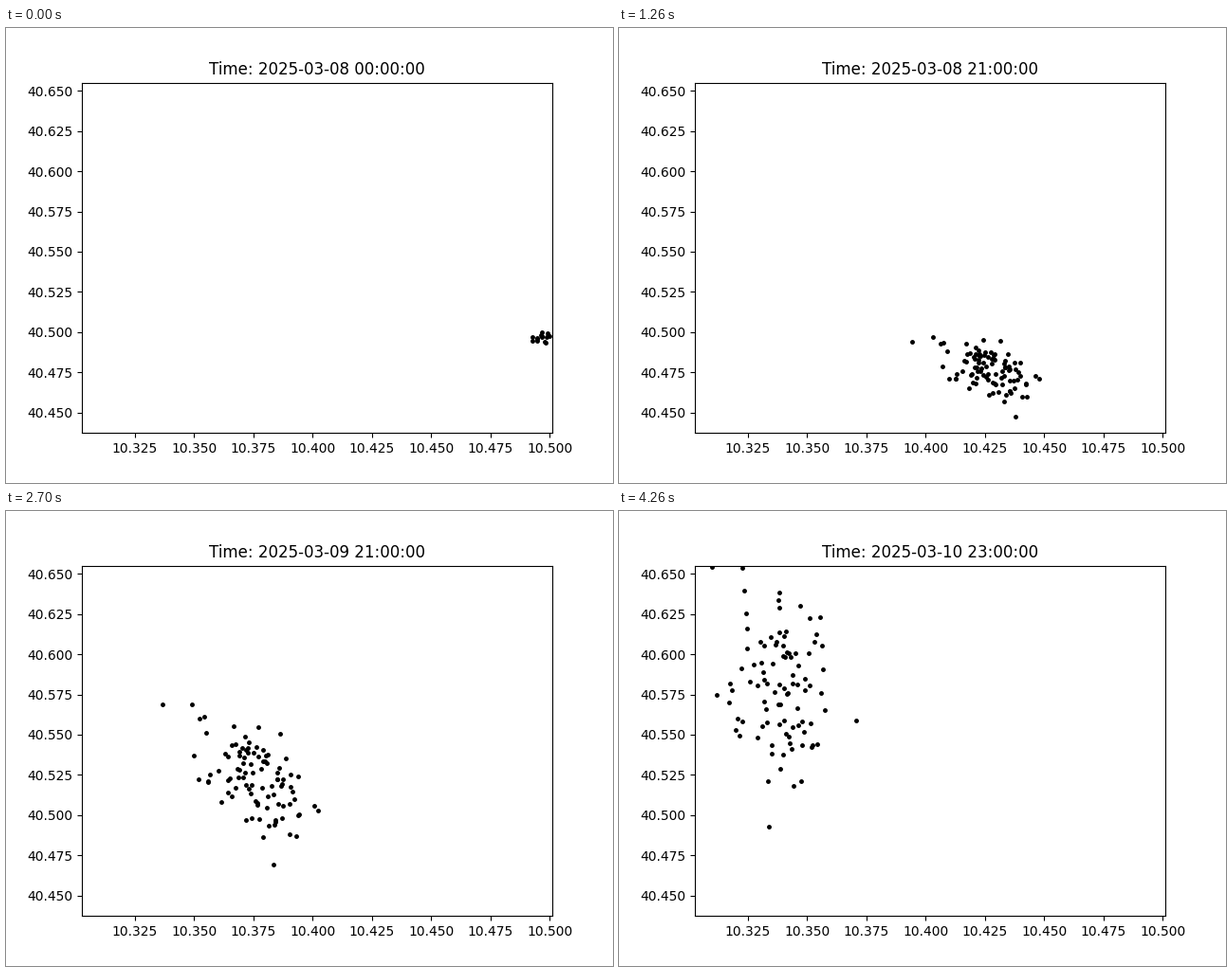
Write a matplotlib script that moves like this. It is 640x480 px and loops after 4.32 s.

```python
import numpy as np
import matplotlib.pyplot as plt
from matplotlib.animation import FuncAnimation

HOURS = 72
SPREAD_END = 14   # hour at which every drifter follows the common flow
PER_HOUR = 14     # drifters released each hour
CROWD = 84
SOURCE = np.array([563.5, 325.0])
XLIM, YLIM = (10.3027, 10.5011), (40.43722, 40.6552)

rng = np.random.default_rng(8)

# Stragglers that shape the rim of the cloud, relative to its centre (pixels)
rim = np.array([(-113, -85), (-75, -84), (-67, -68), (-60, -52), (7, -57),
                (34, -49), (51, 42), (45, 66), (3, 66), (14, 98), (-62, 2)])

# Path of the cloud centre: hour, x, y
path = np.array([(14, 450, 352), (27, 342, 362), (32, 303, 355),
                 (37, 278, 316), (52, 249, 272), (57, 221, 273),
                 (62, 182, 245), (71, 171, 186)], float)


def make_crowd(n):
    """Tilted normal cloud without its far tail."""
    r = np.sqrt(-2 * np.log(1 - 0.88 * rng.random(n)))
    a = rng.uniform(0, 2 * np.pi, n)
    x, y = r * np.cos(a), r * np.sin(a)
    return np.column_stack([40 * x, 38 * (0.4 * x + 0.92 * y)])


def hermite(t, keys, values):
    """Smooth curve through the key values."""
    slope = np.gradient(values, keys)
    i = int(np.clip(np.searchsorted(keys, t, "right") - 1, 0, len(keys) - 2))
    h = keys[i + 1] - keys[i]
    u = (t - keys[i]) / h
    a, b = values[i], values[i + 1]
    p, q = slope[i] * h, slope[i + 1] * h
    return (a + p * u + (3 * (b - a) - 2 * p - q) * u ** 2
            + (2 * (a - b) + p + q) * u ** 3)


def stretch(s):
    """Stretch and shear of the cloud, s running from 0 to 1."""
    bulge = 0.25 * np.exp(-((s - 0.67) / 0.15) ** 2)
    return np.array([[0.55 + 0.28 * s + bulge, 0.2 - 0.45 * s ** 2],
                     [-0.2 * (1 - s) ** 3, 0.45 + 1.05 * s ** 1.25]])


offsets = np.vstack([rim, make_crowd(CROWD)])
count = len(offsets)
scatter = rng.normal(0, 1, (count, 2)) * (16, 8)
scatter[:len(rim)] = 0


def flow(t):
    s = (t - SPREAD_END) / (HOURS - 1 - SPREAD_END)
    centre = [hermite(t, path[:, 0], path[:, k]) for k in (1, 2)]
    late = np.clip((t - 52) / 10, 0, 1)
    return offsets @ stretch(s).T + scatter * late + centre


spread = flow(SPREAD_END)
start = SOURCE + rng.normal(0, 1, (count, 2)) * (5.5, 2.8)
order = np.argsort(spread[:, 0] + rng.normal(0, 9, count))
release = np.empty(count)
release[order] = np.arange(count) // PER_HOUR


def positions(t):
    if t >= SPREAD_END:
        return flow(t)
    s = ((t - release) / (SPREAD_END - release))[:, None]
    return (start + (spread - start) * s)[release <= t]


def to_lonlat(p):
    lon = XLIM[0] + (p[:, 0] - 80) / 496 * (XLIM[1] - XLIM[0])
    lat = YLIM[1] - (p[:, 1] - 57.6) / 369.6 * (YLIM[1] - YLIM[0])
    return lon, lat


fig, ax = plt.subplots(figsize=(6.4, 4.8), dpi=100)
ax.set_xlim(*XLIM)
ax.set_ylim(*YLIM)
dots, = ax.plot([], [], "k.", markersize=5)


def update(hour):
    dots.set_data(*to_lonlat(positions(hour)))
    ax.set_title(f"Time: 2025-03-{8 + hour // 24:02d} {hour % 24:02d}:00:00")
    return dots,


anim = FuncAnimation(fig, update, frames=HOURS, interval=60, repeat=True)
plt.show()
```
